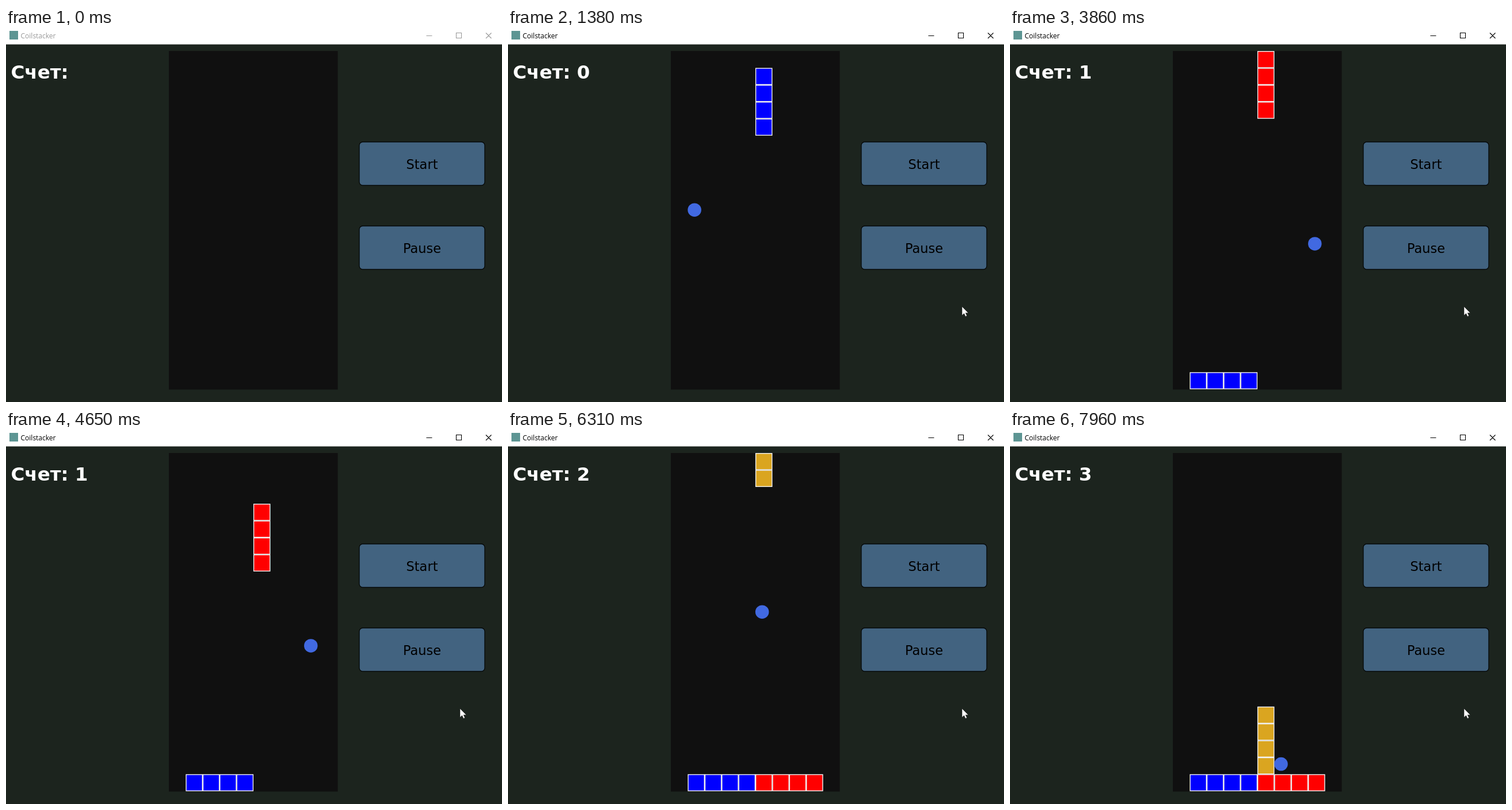
Animation of 862x650 px, one loop 8 s. Source, as an HTML page:

```html
<!DOCTYPE html>
<html lang="ru">
<head>
<meta charset="utf-8">
<title>Coilstacker</title>
<style>
  html, body { margin: 0; width: 100%; height: 100%; overflow: hidden; background: #1c241e; }
  svg { display: block; }
  .caption { font: 12px "Open Sans", sans-serif; }
  .score { font: bold 32.5px "DejaVu Sans", sans-serif; fill: #fff; }
  .button rect { fill: #426380; stroke: #050808; stroke-width: 1.3; }
  .button text { font: 22.5px "DejaVu Sans", sans-serif; text-anchor: middle; }
  .cell { stroke: #f4f4f4; stroke-width: 1.4; }
</style>
</head>
<body>
<svg width="862" height="650" viewBox="0 0 862 650">
  <rect width="862" height="650" fill="#1c241e"/>
  <rect width="862" height="28.5" fill="#fff"/>
  <rect x="6" y="5" width="15" height="15" fill="#5d9593"/>
  <text id="caption" class="caption" x="25.5" y="18">Coilstacker</text>
  <path id="controls" fill="none" stroke-width="1.1"
    d="M730.5 13.5h10M782.5 8.5h9v9h-9zM834 8.5l9.5 9.5M843.5 8.5l-9.5 9.5"/>
  <text id="score" class="score" x="8.5" y="88"></text>
  <rect x="283" y="40" width="293.6" height="588.4" fill="#101010"/>
  <g class="button">
    <rect x="614" y="198" width="218" height="75.5" rx="6"/>
    <text x="723" y="245">Start</text>
  </g>
  <g class="button">
    <rect x="614" y="344" width="218" height="75.5" rx="6"/>
    <text x="723" y="391">Pause</text>
  </g>
  <g id="cells"></g>
  <circle id="ball" r="11.75" fill="#4169e1"/>
  <path id="cursor" fill="#fff" stroke="#111" stroke-width=".6"
    d="M0 0V15.5L3.6 12.2L6 17.4L8.6 16.3L6.3 11.2H11Z"/>
</svg>
<script>
const LOOP = 8000, CELL = 29.38, LEFT = 283, TOP = 40;
const FOCUS = 490, START = 560;

// Times of the game ticks
const ticks = [
  770, 970, 1170, 1380, 1590, 1790, 2000, 2200, 2400, 2600, 2800, 3020,
  3220, 3420, 3630, 3860, 4070, 4270, 4470, 4670, 4880, 5080, 5300, 5500,
  5700, 5900, 6110, 6310, 6510, 6710, 6910, 7110, 7320, 7520, 7740, 7960
];

// Each snake falls to its turn row, moves sideways, eats, then drops
const rounds = [
  { first: 0,  eat: 12, turn: 9,  dir: -1, drop: 10, color: '#00f' },
  { first: 13, eat: 26, turn: 11, dir: 1,  drop: 8,  color: '#f00' },
  { first: 27, eat: 35, turn: 9,  dir: 0,  drop: 9,  color: '#daa520' }
];
const balls = [[1, 9], [8, 11], [5, 9], [6, 18]];

const approach = [[813, 600], [745, 460], [675, 340], [632, 265], [615, 232], [622, 222]];
const retreat = { from: 640, to: 880, steps: 8, end: [789, 484] };

const el = id => document.getElementById(id);
const [caption, controls, score, cells, ball, cursor] =
  ['caption', 'controls', 'score', 'cells', 'ball', 'cursor'].map(el);

function bodyAt({ first, eat, turn, dir, drop }, tick) {
  const head = Math.min(tick, eat) - first;
  const fall = tick >= eat ? drop : 0;
  return [0, 1, 2, 3]
    .map(i => head + 1 - i)
    .filter(step => step >= 0)
    .map(step => [5 + dir * Math.max(0, step - turn), Math.min(step, turn) + fall]);
}

function cellMarkup([col, row], color) {
  const x = LEFT + col * CELL + 0.7, y = TOP + row * CELL + 0.7;
  const size = CELL - 1.2;
  return `<rect class="cell" x="${x}" y="${y}" width="${size}" height="${size}" fill="${color}"/>`;
}

function cursorAt(t) {
  if (t < 30) return null;
  const rest = approach[approach.length - 1];
  if (t < retreat.from) return approach[Math.min(Math.floor((t - 30) / 30), approach.length - 1)];
  const { from, to, steps, end } = retreat;
  const p = Math.min(1, Math.floor((t - from) / (to - from) * steps + 1) / steps);
  const eased = p * p * (3 - 2 * p);
  return rest.map((v, i) => v + (end[i] - v) * eased);
}

let lastTick = null;
function drawCells(tick) {
  if (tick === lastTick) return;
  lastTick = tick;
  cells.innerHTML = rounds
    .filter(round => tick >= round.first)
    .flatMap(round => bodyAt(round, tick).map(c => cellMarkup(c, round.color)))
    .join('');
}

function render(t) {
  const tick = ticks.filter(time => time <= t).length - 1;
  const eaten = rounds.filter(round => tick >= round.eat).length;
  const started = t >= START;
  const ink = t >= FOCUS ? '#000' : '#999';
  caption.setAttribute('fill', ink);
  controls.setAttribute('stroke', ink);
  score.textContent = started ? `Счет: ${eaten}` : 'Счет:';

  const [col, row] = balls[eaten];
  ball.setAttribute('visibility', started ? 'visible' : 'hidden');
  ball.setAttribute('cx', LEFT + col * CELL + 11.75);
  ball.setAttribute('cy', TOP + row * CELL + 11.75);
  drawCells(tick);

  const tip = cursorAt(t);
  cursor.setAttribute('visibility', tip ? 'visible' : 'hidden');
  if (tip) cursor.setAttribute('transform', `translate(${tip})`);
}

const origin = performance.now();
function frame() {
  render((performance.now() - origin) % LOOP);
  requestAnimationFrame(frame);
}
frame();
</script>
</body>
</html>
```
